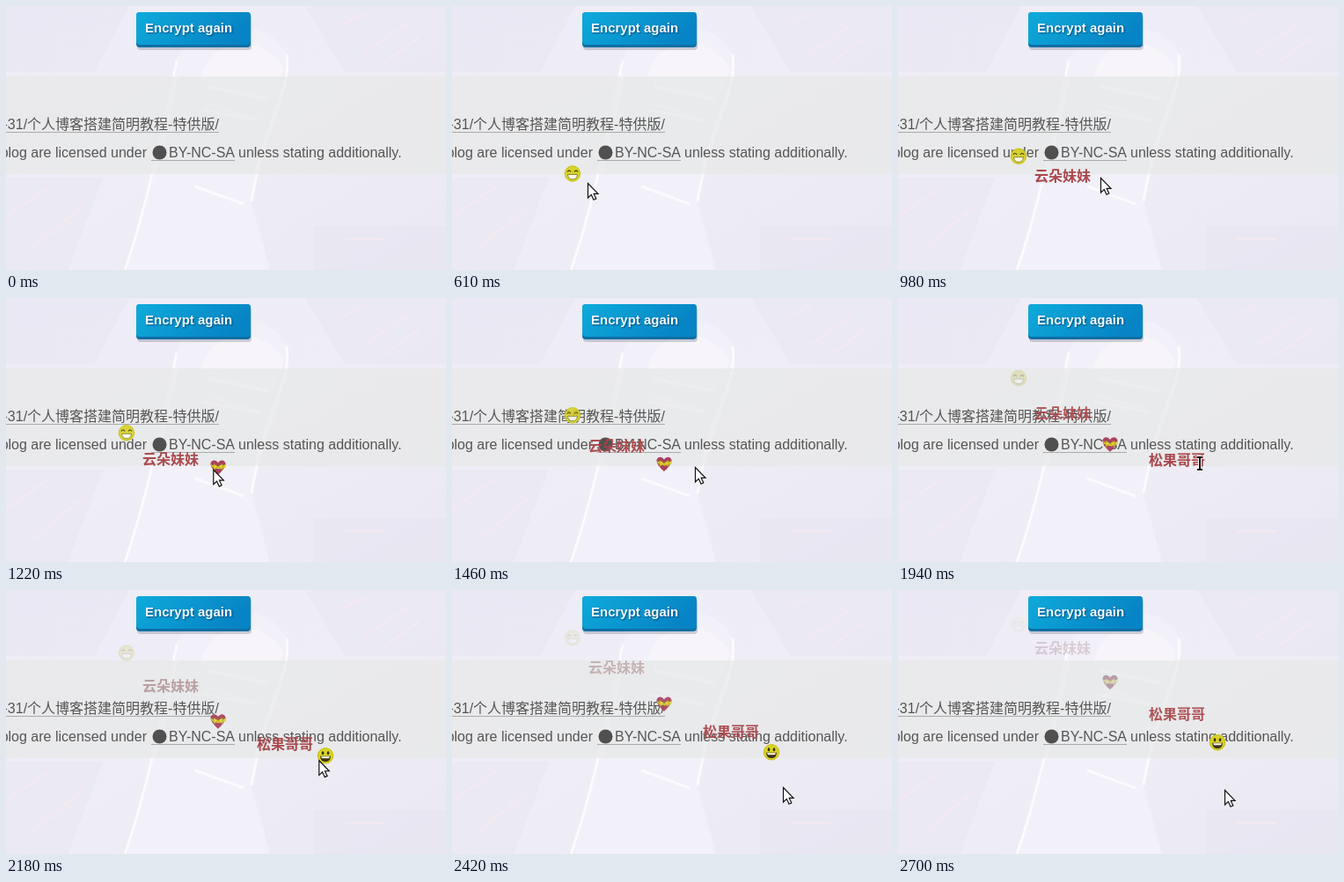
Animation of 500x300 px, one loop 2770 ms. Source, as an HTML page:

```html
<!DOCTYPE html>
<html lang="en">
<head>
<meta charset="utf-8">
<title>Click effects</title>
<style>
  html, body { margin: 0; width: 100%; height: 100%; overflow: hidden; }
  svg { display: block; width: 500px; height: 300px; }
  text { font: 16px "Liberation Sans", "Noto Sans CJK SC", "Noto Sans CJK", sans-serif; fill: #555; }
  .button { font-weight: bold; font-size: 15px; fill: #f4fbff; text-shadow: 1px 1px 2px #034a78; }
  .cheer { font: bold 16px "Noto Sans CJK SC", "Noto Sans CJK", sans-serif; fill: #a9464a; }
</style>
</head>
<body>
<svg viewBox="0 0 500 300">
  <defs>
    <linearGradient id="sky" x2="1" y2="1">
      <stop stop-color="#eeecf7"/><stop offset=".5" stop-color="#efedf6"/><stop offset="1" stop-color="#eae8f2"/>
    </linearGradient>
    <linearGradient id="blue" x2="1" y2=".3">
      <stop stop-color="#0eabdb"/><stop offset="1" stop-color="#0784c5"/>
    </linearGradient>
    <g id="face">
      <circle r="9.2" fill="#d9d326"/>
      <circle r="8.6" fill="none" stroke="#b9b31c" stroke-opacity=".6"/>
    </g>
  </defs>

  <rect width="500" height="300" fill="url(#sky)"/>
  <g id="photo">
    <path d="M0 0H140L100 75H0zM340 0H500V75H385zM0 195H110L70 300H0zM350 250H500V300H350z" fill="#e5e2ef" opacity=".45"/>
    <path d="M135 300C160 230 180 130 194 62C210 12 300 10 319 55C325 100 290 150 279 222L300 300z" fill="#f2f0f8"/>
    <path d="M222 82C230 35 292 28 316 72L300 110Z" fill="#f7f5fa"/>
    <path d="M194 62C180 130 160 230 135 300M319 55C325 100 290 150 279 222M230 90L297 104M226 110L290 130M215 205L270 225" fill="none" stroke="#fbfafd" stroke-width="3"/>
    <path d="M430 65l40-30M405 55l50-35M380 22l28-14M385 265h45M0 240l50-35M30 275l60-50" stroke="#f3e9f1" stroke-width="3"/>
  </g>
  <rect y="80" width="500" height="111" fill="#e8e9e9" opacity=".82"/>
  <g fill="none" stroke="#f1f1f2" stroke-width="3" opacity=".6">
    <path d="M194 80C186 120 178 155 169 191M319 80C310 115 292 150 284 191M229 92L297 106M224 118L286 130"/>
  </g>

  <rect x="149" y="10" width="130" height="40" rx="4" fill="#667" opacity=".3"/>
  <rect x="148" y="7" width="130" height="40" rx="4" fill="#0b6fa6"/>
  <rect x="148" y="7" width="130" height="37" rx="4" fill="url(#blue)"/>
  <text class="button" x="158" y="30">Encrypt again</text>

  <text x="-3.5" y="140">-31/个人博客搭建简明教程-特供版/</text>
  <text x="160" y="172" text-anchor="end">blog are licensed under</text>
  <circle cx="174.5" cy="166.5" r="8" fill="#505050"/>
  <text x="185" y="172">BY-NC-SA</text>
  <text x="264" y="172">unless stating additionally.</text>
  <path d="M0 143.5H242M165 175.5H260" stroke="#aaa"/>

  <g class="pop">
    <use href="#face"/>
    <path d="M-6-2q2-3 4 0M2-2q2-3 4 0" fill="none" stroke="#4c4812" stroke-width="1.3"/>
    <path d="M-5.5 1H5.5Q5 6.5 0 6.5T-5.5 1z" fill="#fbfbe9" stroke="#77701c" stroke-width=".8"/>
  </g>
  <g class="pop"><text class="cheer" y="6">云朵妹妹</text></g>
  <g class="pop">
    <path d="M0 8.5C-5 4-9-1-8.5-4.5C-7.5-9-2-9 0-5C2-9 7.5-9 8.5-4.5C9-1 5 4 0 8.5z" fill="#a9405c"/>
    <path d="M-8.5-3.5Q0 1 8.5-3.5V0Q0 4 -7-.5z" fill="#d8cb2b"/>
    <path d="M0-1L-5-4V3zL5-4V3z" fill="#e0d52c" stroke="#a18b24" stroke-width=".6"/>
  </g>
  <g class="pop"><text class="cheer" y="6">松果哥哥</text></g>
  <g class="pop">
    <use href="#face"/>
    <ellipse cx="-3" cy="-3" rx="1.3" ry="2" fill="#33300e"/>
    <ellipse cx="3" cy="-3" rx="1.3" ry="2" fill="#33300e"/>
    <path d="M-6 .5H6Q5.5 7 0 7T-6 .5z" fill="#3c3210"/>
    <path d="M-5 1H5L4 3H-4z" fill="#fff"/>
  </g>

  <path id="arrow" d="M.5 .5V17L4.3 13.4L7 19.3L9.8 18L7.2 12.4H12z" fill="#fff" stroke="#111" stroke-width="1.2"/>
  <g id="beam" fill="none">
    <path d="M-3-7H3M0-7V7M-3 7H3" stroke="#fff" stroke-width="4"/>
    <path d="M-3-7H3M0-7V7M-3 7H3" stroke="#111" stroke-width="2"/>
  </g>
</svg>
<script>
const LOOP = 2770, RISE_TIME = 3000, RISE = 170;
// click time, x, starting y
const clicks = [[180, 137, 199], [640, 155, 198], [1170, 241, 192.5], [1650, 285, 187.5], [2120, 363, 188.5]];
// time, x, y of the pointer
const path = [[40, 128, 201], [180, 128, 201], [610, 154, 201], [690, 157, 201], [980, 230, 195],
  [1170, 232, 195], [1460, 276, 192], [1650, 286, 190.5], [1940, 343, 188], [2120, 353, 190],
  [2420, 376, 224], [2700, 371, 227]];
const pops = document.querySelectorAll('.pop');
const arrow = document.getElementById('arrow'), beam = document.getElementById('beam');

const swing = p => 0.5 - Math.cos(Math.PI * p) / 2;
const show = (el, on) => el.setAttribute('visibility', on ? 'visible' : 'hidden');
const move = (el, x, y) => el.setAttribute('transform', `translate(${x} ${y})`);

function pointer(t) {
  const i = path.findIndex(k => k[0] > t);
  if (i < 0) return path[path.length - 1].slice(1);
  if (i === 0) return path[0].slice(1);
  const [a, b] = [path[i - 1], path[i]];
  const k = swing((t - a[0]) / (b[0] - a[0]));
  return [a[1] + (b[1] - a[1]) * k, a[2] + (b[2] - a[2]) * k];
}

function draw(now) {
  const t = now % LOOP;
  clicks.forEach(([start, x, y], i) => {
    const s = swing((t - start) / RISE_TIME), pale = s > 0.45;
    show(pops[i], t >= start);
    move(pops[i], x, y - RISE * s);
    pops[i].style.opacity = pale ? 1 - s : 1 - 0.3 * s;
    pops[i].style.filter = pale ? 'saturate(.55)' : 'none';
  });
  const [x, y] = pointer(t), overText = t > 1740 && t < 2060;
  move(arrow, x, y);
  move(beam, x, y);
  show(arrow, t >= 40 && !overText);
  show(beam, overText);
  requestAnimationFrame(draw);
}
requestAnimationFrame(draw);
</script>
</body>
</html>
```
